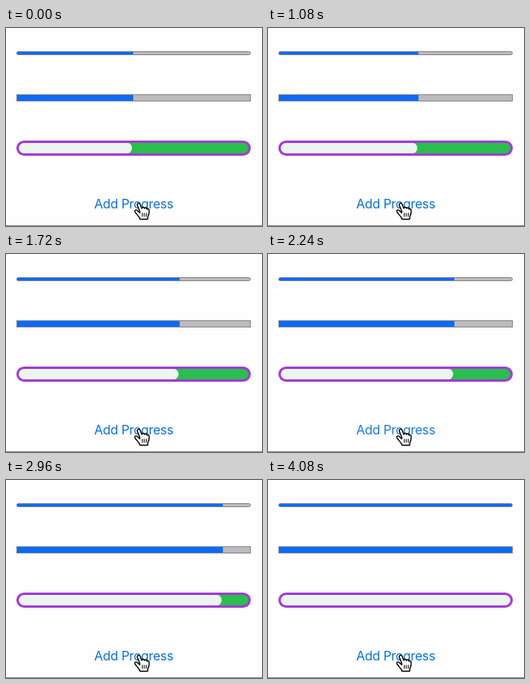
An HTML page for the animation above (4240 ms loop, 320 by 248 pixels).

```html
<!DOCTYPE html>
<html lang="en">
<head>
<meta charset="utf-8">
<title>Progress bars</title>
<style>
  html, body { margin: 0; width: 100%; height: 100%; overflow: hidden; background: #fefefe; }
  svg { display: block; width: 100%; height: 100%; }
  text { font: 16px Inter, "Liberation Sans", sans-serif; letter-spacing: -0.3px; fill: #0a70d6; }
  .fill { fill: #086bff; }
  .track { fill: #bdbabe; }
  .frame { fill: none; stroke: #858488; }
</style>
</head>
<body>
<svg viewBox="0 0 320 248">
  <rect class="track" x="13.5" y="29.5" width="292" height="4" rx="2"/>
  <rect class="fill" id="thin" x="13.5" y="29.5" height="4" rx="1.5"/>
  <rect class="frame" x="13.5" y="29.5" width="292" height="4" rx="2"/>

  <rect class="track" x="13.5" y="83.5" width="292" height="8"/>
  <rect class="fill" id="square" x="13.5" y="83.5" height="8"/>
  <rect class="frame" x="13.5" y="83.5" width="292" height="8"/>

  <rect x="14.5" y="142.5" width="290" height="16" rx="8" fill="#28bf4c"/>
  <rect id="pill" x="14.5" y="143.5" height="14" rx="7" fill="#edf5ef"/>
  <rect x="14.5" y="142.5" width="290" height="16" rx="8" fill="none" stroke="#a33bd5" stroke-width="3"/>

  <text id="label" x="159.7" y="225.5" text-anchor="middle">Add Progress</text>

  <g stroke="#000" stroke-linejoin="round" stroke-linecap="round">
    <path fill="#fff" stroke-width="1.4" d="M167.2 229.4L164.3 222.6C163.3 219.6 166.3 218 167.6 220.8L169.8 226
      C170.6 223.9 172.6 224.2 173.2 226C174 224.6 176 225 176.3 227C177.6 226 179 227 179 228.8
      C179.2 232 178.6 234 177.4 236L177 239.5H167.5C167.2 236.5 163.5 234 161.2 230.4
      C160.2 228.4 162.5 227.2 164 228.4L167.2 231.5Z"/>
    <path fill="none" d="M170.3 232v4M172.8 232v4M175.3 232v4"/>
  </g>
  <path d="M0 247.5H320" stroke="#8c8c8c"/>
</svg>
<script>
  const LOOP = 4240, GROW = 350, FADE = 200;
  const LEFT = 13, WIDTH = 292;
  // Button press and release times in ms; each release adds a tenth.
  const taps = [[600, 705], [1320, 1390], [1920, 2058], [2520, 2700], [3320, 3408]];

  const clamp = v => Math.min(1, Math.max(0, v));
  const ease = v => v * v * (3 - 2 * v);
  const byId = id => document.getElementById(id);
  const [thin, square, pill, label] = ["thin", "square", "pill", "label"].map(byId);

  function draw(now) {
    const t = now % LOOP;
    let progress = 0.5, opacity = 1;
    for (const [press, release] of taps) {
      progress += 0.1 * ease(clamp((t - release) / GROW));
      if (t >= press) opacity = 0.2 + 0.8 * clamp((t - release) / FADE);
    }
    const edge = LEFT + WIDTH * progress;
    thin.setAttribute("width", edge - 13.5);
    square.setAttribute("width", edge - 13.5);
    pill.setAttribute("width", edge - 16);
    label.setAttribute("opacity", opacity);
  }

  const start = performance.now();
  function tick() {
    draw(performance.now() - start);
    requestAnimationFrame(tick);
  }
  tick();
</script>
</body>
</html>
```
